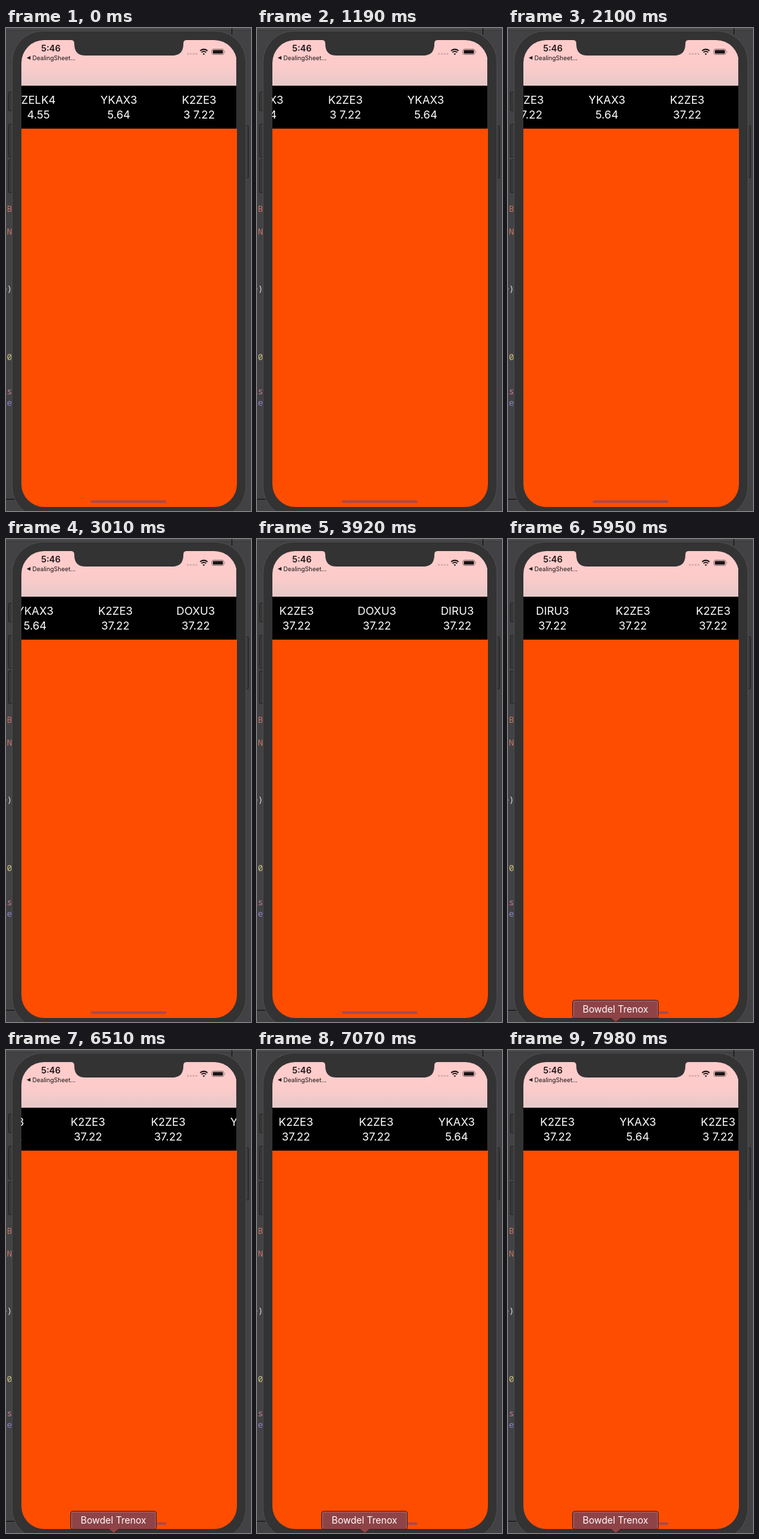
These frames come from a looping animation (366 by 720 pixels, 8 s). An HTML page:

```html
<!DOCTYPE html>
<html lang="en">
<head>
<meta charset="utf-8">
<title>Stock ticker</title>
<style>
  html, body { margin: 0; width: 100%; height: 100%; overflow: hidden; background: #424244; }
  svg { display: block; width: 100%; height: 100%; }
  text { font-family: Inter, Roboto, sans-serif; }
  .code text { font: 13px "Noto Sans Mono", "DejaVu Sans Mono", monospace; text-anchor: end; }
  #ticker text { font-size: 16.5px; fill: #fff; text-anchor: middle; white-space: pre; }
</style>
</head>
<body>
<svg viewBox="0 0 366 720">
  <defs>
    <linearGradient id="header" x1="0" y1="18" x2="0" y2="86" gradientUnits="userSpaceOnUse">
      <stop stop-color="#ffcccb"/>
      <stop offset=".6" stop-color="#fbcbca"/>
      <stop offset="1" stop-color="#e6c8c8"/>
    </linearGradient>
    <clipPath id="screen"><rect x="23" y="18" width="322" height="696" rx="34"/></clipPath>
    <clipPath id="band"><rect x="22.5" y="86" width="321.5" height="64"/></clipPath>
  </defs>

  <!-- editor behind the phone -->
  <rect width="366" height="720" fill="#424244"/>
  <rect width="366" height="3" fill="#4a4a4b"/>
  <path d="M0 3.5H366" stroke="#38383a"/>
  <path d="M337.5 0V10M0 702.5H14" stroke="#0c0c0c"/>
  <g class="code">
    <text x="9" y="274" fill="#c87464">IB</text>
    <text x="9" y="308" fill="#c87464">IN</text>
    <text x="9" y="393" fill="#d8d8d8">e)</text>
    <text x="9" y="495" fill="#cbbf7c">0</text>
    <text x="9" y="546" fill="#d27a9c">ls</text>
    <text x="9" y="563" fill="#8f80c8">le</text>
  </g>

  <!-- phone body -->
  <g fill="#38383a" stroke="#242425">
    <rect x="3.5" y="95.5" width="8" height="28" rx="2"/>
    <rect x="3.5" y="143.5" width="8" height="49" rx="2"/>
    <rect x="3.5" y="196.5" width="8" height="49" rx="2"/>
    <rect x="355" y="145.5" width="7.5" height="78" rx="2"/>
  </g>
  <rect x="9" y="4.5" width="349.5" height="725" rx="46" fill="#333334" stroke="#505052"/>

  <!-- app screen -->
  <g clip-path="url(#screen)">
    <rect x="23" y="18" width="321" height="69" fill="url(#header)"/>
    <rect x="23" y="86" width="321" height="64" fill="#000"/>
    <rect x="23" y="150" width="322" height="564" fill="#ff4d00"/>
  </g>
  <path d="M97 17V18Q102 18 102 23C102 35 107 41 119 41H248C260 41 265 35 265 23Q265 18 270 18V17Z" fill="#333334"/>

  <!-- status bar -->
  <g fill="#1b1415">
    <text x="67" y="34.5" font-size="13" font-weight="600" text-anchor="middle">5:46</text>
    <path d="M31 44.5L36.5 41.7V47.3Z"/>
    <text x="39.5" y="47.6" font-size="9">DealingSheet...</text>
    <rect x="307.5" y="31.5" width="18" height="8" rx="2.5" fill="none" stroke="#8d7373"/>
    <rect x="309" y="32.8" width="15" height="5.4" rx="1.3"/>
    <path d="M327 34V37Q328.3 35.5 327 34Z" fill="#8d7373"/>
    <path d="M293.8 38.4Q295.5 36.9 297.2 38.4L295.5 40.2Z"/>
    <path d="M290 34Q295.5 29.5 301 34M292 36.4Q295.5 33.4 299 36.4" fill="none" stroke="#1b1415" stroke-width="1.7"/>
  </g>
  <path d="M271.8 38.5H286" stroke="#d6abaa" stroke-width="3" stroke-linecap="round" stroke-dasharray="0 4.2"/>

  <g clip-path="url(#band)"><g id="ticker"></g></g>

  <path d="M128.5 706H238" stroke="#a54a52" stroke-width="3.6" stroke-linecap="round"/>

  <g id="tooltip">
    <path d="M100.5 687.5H221.5Q224.5 687.5 224.5 690.5V711.5Q224.5 714.5 221.5 714.5H168L161 720.5L154 714.5H100.5Q96.5 714.5 96.5 711.5V690.5Q96.5 687.5 100.5 687.5Z" fill="#8e4347" stroke="#401c1e"/>
    <path d="M98 713V691Q98 688.8 100.5 688.8H221Q223.3 688.8 223.3 691V713" fill="none" stroke="#b06a6c"/>
    <text x="160.5" y="706" font-size="14" fill="#fff" text-anchor="middle">Bowdel Trenox</text>
  </g>
</svg>
<script>
  const LOOP = 8000, STEP = 70, PITCH = 120, FIRST_X = 48.5;
  const SPEED = 0.1146;          // px per ms
  const TOOLTIP_AT = 5810;
  const quotes = [
    ["ZELK4", "4.55"], ["YKAX3", "5.64"], ["K2ZE3", "3 7.22"], ["YKAX3", "5.64"],
    ["K2ZE3", "37.22"], ["DOXU3", "37.22"], ["DIRU3", "37.22"], ["K2ZE3", "37.22"],
    ["K2ZE3", "37.22"], ["YKAX3", "5.64"], ["K2ZE3", "3 7.22"]
  ];
  const ticker = document.getElementById("ticker");
  const tooltip = document.getElementById("tooltip");

  function addText(x, y, content) {
    const el = document.createElementNS("http://www.w3.org/2000/svg", "text");
    el.setAttribute("x", x);
    el.setAttribute("y", y);
    el.textContent = content;
    ticker.append(el);
  }
  quotes.forEach(([symbol, price], i) => {
    const x = FIRST_X + i * PITCH;
    addText(x, 113, symbol);
    addText(x, 134.5, price);
  });

  // The ticker stalls briefly, catches up, then scrolls evenly.
  function scrollAt(t) {
    if (t < 70) return 0;
    if (t < 630) return 8;
    return 92.3 + (t - 630) * SPEED;
  }

  function draw(now) {
    const elapsed = now % LOOP;
    const t = Math.floor(elapsed / STEP) * STEP;
    ticker.setAttribute("transform", `translate(${-scrollAt(t)} 0)`);
    tooltip.style.display = t >= TOOLTIP_AT ? "" : "none";
  }

  const start = performance.now();
  function tick() {
    draw(performance.now() - start);
    requestAnimationFrame(tick);
  }
  tick();
</script>
</body>
</html>
```
